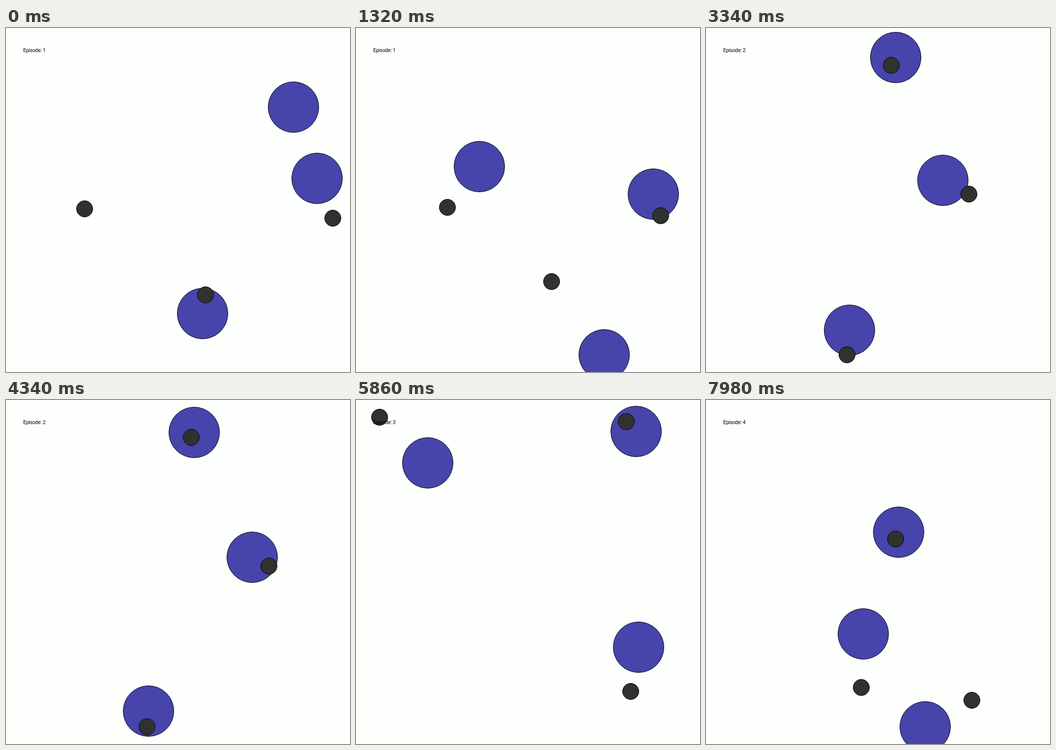
Write an HTML page with a canvas that moves like this. It is 700 px wide and 700 px high and loops after 8000 ms.

```html
<!DOCTYPE html>
<html lang="en">
<head>
<meta charset="utf-8">
<title>Episodes</title>
<style>
  html, body { margin: 0; width: 100%; height: 100%; overflow: hidden; background: #fdfffd; }
  canvas { display: block; width: 700px; height: 700px; }
</style>
</head>
<body>
<canvas id="stage" width="700" height="700"></canvas>
<script>
const LOOP = 8000, STEP = 100, FIRST = 20, EPISODE = 2520, OFFSET = 600;
const CENTER = 350, REACH = 315;
const DRAG = 0.8;      // share of speed kept per step while settling
const RUN_UP = 0.3;    // share of the main leg covered before it
const HOMING = 0.4;    // share of the way to the nearest landmark covered after it
const AGENT = { radius: 52, color: '#4744ab' };
const LANDMARK = { radius: 17, color: '#30322f' };

const settle = (from, to) => ({ from, to });
const cruise = (from, to) => ({ from, to, steady: true });

// Each agent has one main leg, from step legStart to step legEnd.
const episodes = [
  {
    legStart: 6, legEnd: 20,
    landmarks: [[159.5, 368], [665, 387], [406, 543]],
    agents: [settle([585, 161], [235, 271]), settle([633, 306], [647, 336]), cruise([400, 581], [530, 716.9])]
  },
  {
    legStart: 6, legEnd: 15,
    landmarks: [[377, 76], [535, 338], [287, 665]],
    agents: [settle([360, 151], [386, 60]), settle([125, 452], [292, 615]), settle([611, 494], [482, 310])]
  },
  {
    legStart: 6, legEnd: 15,
    landmarks: [[48, 35], [550, 44], [559, 593]],
    agents: [settle([393, 139], [570, 64]), settle([338, 260], [146, 128]), settle([228, 614], [575, 503])]
  },
  {
    legStart: 0, legEnd: 11,
    landmarks: [[393, 269], [309, 634], [580, 665]],
    agents: [settle([450, 48], [401, 252]), settle([602, 400], [314, 502]), cruise([400, 600], [466, 730])]
  }
];

const ctx = document.getElementById('stage').getContext('2d');

const mix = (a, b, u) => a.map((n, i) => n + (b[i] - n) * u);
const decay = steps => 1 - DRAG ** steps;
const distance = (a, b) => Math.hypot(a[0] - b[0], a[1] - b[1]);
const nearest = (point, list) =>
  list.reduce((best, p) => distance(p, point) < distance(best, point) ? p : best);

// Agents speed up from rest, lose speed along the main leg, then home in.
function agentAt({ from, to, steady }, { legStart, legEnd, landmarks }, step) {
  const done = step - legStart, length = legEnd - legStart;
  if (steady) return mix(from, to, done / length);
  if (done < 0) return mix(from, to, RUN_UP * ((step / legStart) ** 2 - 1));
  if (done <= length) return mix(from, to, decay(done) / decay(length));
  return mix(to, nearest(to, landmarks), HOMING * decay(done - length));
}

function drawDisc([x, y], { radius, color }) {
  ctx.beginPath();
  ctx.arc(x, y, radius - 0.5, 0, Math.PI * 2);
  ctx.fillStyle = color;
  ctx.fill();
  ctx.stroke();
}

function draw(time) {
  const index = Math.floor((time + OFFSET) / EPISODE);
  const elapsed = (time + OFFSET) % EPISODE;
  const step = Math.max(0, 1 + Math.floor((elapsed - FIRST) / STEP));
  const episode = episodes[index];
  const agents = episode.agents.map(agent => agentAt(agent, episode, step));

  // The camera zooms so that the outermost disc stays at a fixed reach.
  const offsets = [...agents, ...episode.landmarks].flat().map(n => Math.abs(n - CENTER));
  const zoom = REACH / Math.max(...offsets);
  const project = point => point.map(n => Math.round(CENTER + (n - CENTER) * zoom));

  ctx.fillStyle = '#fdfffd';
  ctx.fillRect(0, 0, 700, 700);
  ctx.strokeStyle = '#000';
  ctx.lineWidth = 1;
  agents.forEach(p => drawDisc(project(p), AGENT));
  episode.landmarks.forEach(p => drawDisc(project(p), LANDMARK));

  ctx.font = '10.5px Roboto, "Open Sans", sans-serif';
  ctx.letterSpacing = '-0.3px';
  ctx.fillStyle = '#000';
  ctx.fillText(`Episode: ${index + 1}`, 35, 49);
}

const origin = performance.now();
function tick() {
  draw((performance.now() - origin) % LOOP);
  requestAnimationFrame(tick);
}
tick();
</script>
</body>
</html>
```
